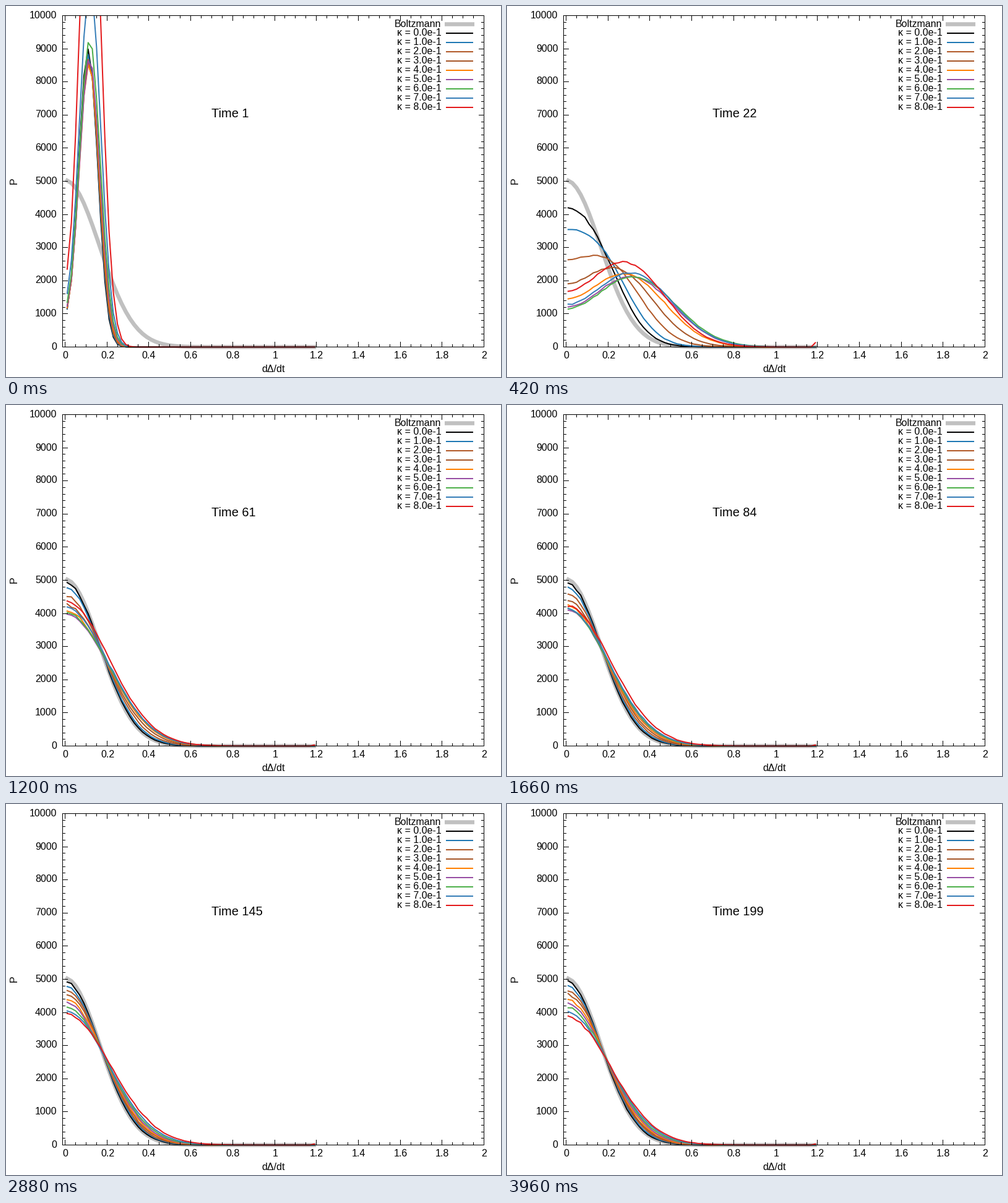
A matplotlib script for the animation above (3.98 s loop, 800x600 px).

```python
import numpy as np
import matplotlib.pyplot as plt
from matplotlib.animation import FuncAnimation
from matplotlib.patches import Rectangle

W, H, DPI = 800, 600, 100
PX = 72 / DPI
FRAMES, INTERVAL = 199, 20
LEFT, RIGHT, TOP, BOTTOM = 91, 772, 15, 551
COLORS = ["#000000", "#1f78b4", "#b15928", "#a65628", "#ff7f00",
          "#984ea3", "#4daf4a", "#377eb8", "#e41a1c"]
GRAY = "#c0c0c0"

plt.rcParams["font.family"] = "Liberation Sans"
fig = plt.figure(figsize=(W / DPI, H / DPI), dpi=DPI, facecolor="white")
ax = fig.add_axes([0, 0, 1, 1])
# Whole numbers are pixel centres.
ax.set_xlim(-0.5, W - 0.5)
ax.set_ylim(H - 0.5, -0.5)
ax.axis("off")


def px(x):
    return 95 + 338.5 * np.asarray(x)


def py(p):
    return BOTTOM - 0.0536 * np.asarray(p)


def line(xs, ys, color="black", width=1, **kw):
    return ax.plot(xs, ys, color=color, lw=width * PX, **kw)[0]


def text(x, y, s, size=16, **kw):
    kw = {"ha": "center", "va": "baseline", **kw}
    return ax.text(x, y - 0.5, s, fontsize=size * PX, **kw)


# Model: each curve is a normal density of centre mu and width s, folded at 0.
k = np.arange(9)
keys = np.array([1, 22, 38, 61, 108, 145, 199])
x = 0.01 + 0.02 * np.arange(60)


def area(t):
    excess = 1000 * 0.37 ** (8 - k)
    fade = 0.84 * np.exp(-(t - 1) / 6) + 0.16 * (1 - (t - 1) / 198)
    return 1035 + excess * fade


def slopes(v):
    """Monotone slopes at the key times."""
    d = np.diff(v, axis=0) / np.diff(keys)[:, None]
    a, b = d[:-1], d[1:]
    same = a * b > 0
    mid = np.where(same, 2 * a * b / np.where(same, a + b, 1), 0)
    return np.vstack([d[:1], mid, d[-1:]])


def hermite(t, v, m):
    i = min(np.searchsorted(keys, t, side="right") - 1, len(keys) - 2)
    h = keys[i + 1] - keys[i]
    u = (t - keys[i]) / h
    return ((1 + 2 * u) * (1 - u) ** 2 * v[i] + u * (1 - u) ** 2 * h * m[i]
            + u * u * (3 - 2 * u) * v[i + 1] + u * u * (u - 1) * h * m[i + 1])


# Peak heights swing around their settled values, then die out.
settled = 4950 - 135 * k
swings = [
    320 * (1 + np.exp(-2 * k)) * np.sin(np.pi * (k - 1.2) / 3.4),
    -90 * k * np.sin(np.pi * k / 6.4),
    210 * (k / 8) ** 5,
    100 * (k / 8) ** 5,
    0 * k,
]
late = [area(t) / (np.sqrt(np.pi / 2) * (settled + d))
        for t, d in zip(keys[2:], swings)]
hump = np.sin(np.pi * k / 12) ** 1.5
width = np.vstack([0.046 + 0.00075 * k, 0.145 + 0.055 * hump, late])
centre = np.vstack([0.11 + 0.00125 * k, 0.112 + 0.21 * hump, np.zeros((5, 9))])
width_m, centre_m = slopes(width), slopes(centre)


def curves(t):
    s = hermite(t, width, width_m)[:, None]
    mu = hermite(t, centre, centre_m)[:, None]
    bells = np.exp(-((x - mu) / s) ** 2 / 2) + np.exp(-((x + mu) / s) ** 2 / 2)
    p = area(t)[:, None] / (s * np.sqrt(2 * np.pi)) * bells
    rng = np.random.default_rng(t)
    p = np.maximum(p + 0.25 * np.sqrt(p) * rng.standard_normal(p.shape), 0)
    # The last bin collects the overflow.
    p[8, -1] += (30 + 100 * np.exp(-((t - 22) / 16) ** 2)) * min(1, (t - 1) / 10)
    return p


# Curves
clip = Rectangle((LEFT, TOP - 0.5), RIGHT - LEFT, H - TOP, transform=ax.transData)
boltzmann = 5030 * np.exp(-(x / 0.1645) ** 2 / 2)
line(px(x), py(boltzmann), GRAY, 6.5, solid_capstyle="projecting")
plots = []
for c in COLORS:
    ln = line(px(x), py(0 * x), c, 2, solid_capstyle="projecting",
              solid_joinstyle="round")
    ln.set_clip_path(clip)
    plots.append(ln)

# Frame and ticks
for j in range(41):
    tx, n = np.round(px(j * 0.05)), 4 if j % 4 else 8
    line([tx, tx], [BOTTOM, BOTTOM - n], snap=False)
    line([tx, tx], [TOP, TOP + n], snap=False)
    if j % 4 == 0:
        text(tx + 0.5, 570, f"{j / 20:g}")
for j in range(51):
    ty, n = np.round(py(j * 200)), 4 if j % 5 else 8
    line([LEFT, LEFT + n], [ty, ty], snap=False)
    line([RIGHT, RIGHT - n], [ty, ty], snap=False)
    if j % 5 == 0:
        text(82, ty + 4.5, f"{j * 200}", ha="right")
line([LEFT, RIGHT, RIGHT, LEFT, LEFT], [BOTTOM, BOTTOM, TOP, TOP, BOTTOM],
     solid_joinstyle="miter", snap=False)
text(431.5, 592, "dΔ/dt")
text(17, 283, "P", rotation=90, rotation_mode="anchor")

# Legend
text(703, 33.5, "Boltzmann", ha="right")
line([708.5, 756.5], [29, 29], GRAY, 6.5, solid_capstyle="butt", snap=False)
for i, c in enumerate(COLORS):
    y = 29 + 14.94 * (i + 1)
    text(703, y + 4.5, f"κ = {i}.0e-1", ha="right")
    line([710.5, 754.5], [y, y], c, 2, solid_capstyle="butt")

clock = text(332, 180, "Time 1", 20, ha="left")


def update(i):
    t = i + 1
    for ln, p in zip(plots, curves(t)):
        ln.set_ydata(py(p))
    clock.set_text(f"Time {t}")
    return [*plots, clock]


anim = FuncAnimation(fig, update, frames=FRAMES, interval=INTERVAL,
                     repeat=True, repeat_delay=0, blit=False)
plt.show()
```
